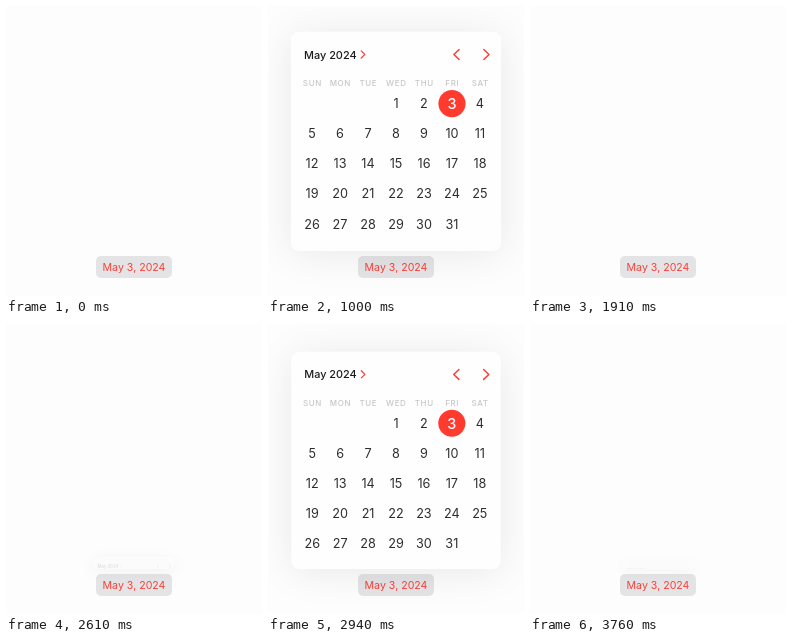
An HTML page with a canvas that plays this animation: 256 px wide and 290 px high, repeating every 3790 ms.

```html
<!DOCTYPE html>
<html lang="en">
<head>
<meta charset="utf-8">
<title>Compact date picker</title>
<style>
  html, body { margin: 0; width: 100%; height: 100%; overflow: hidden; background: #fdfdfd; }
  canvas { display: block; width: 256px; height: 290px; }
</style>
</head>
<body>
<canvas></canvas>
<script>
const W = 256, H = 290, LOOP = 3790;
const CARD = { w: 210, h: 219.5, bottom: 245, radius: 8 };
const RED = '#ff3b30', INK = '#1c1c1e', SOFT_INK = '#2e2e30';
const canvas = document.querySelector('canvas');
const ctx = canvas.getContext('2d');
const dpr = window.devicePixelRatio || 1;
canvas.width = W * dpr;
canvas.height = H * dpr;

// Soft start, quick rise, long tail
const settle = (t, rate) =>
  (1 - Math.exp(-((t / 60) ** 2))) * (1 - Math.exp(-rate * (t / 170) ** 0.713));
const collapse = u => u < 1 ? (1 - u ** 3) ** 3 : 0;

// How far the popover is open, 0 to 1
function openness(t) {
  if (t < 820) return 0;
  if (t < 1240) return settle(t - 800, 6);
  if (t < 1640) return 1;
  if (t < 1910) return collapse((t - 1640) / 270);
  if (t < 2610) return 0;
  if (t < 3090) return settle(t - 2590, 2.75);
  if (t < 3550) return 1;
  return collapse((t - 3550) / 240);
}

function text(str, x, y, size, color, weight = 400, align = 'center', spacing = 0) {
  ctx.font = `${weight} ${size}px Inter, sans-serif`;
  ctx.letterSpacing = spacing + 'px';
  ctx.textAlign = align;
  ctx.fillStyle = color;
  ctx.fillText(str, x, y);
}

function roundBox(x, y, w, h, r, color) {
  ctx.beginPath();
  ctx.roundRect(x, y, w, h, r);
  ctx.fillStyle = color;
  ctx.fill();
}

function chevron(x, y, dx, dy, width) {
  ctx.beginPath();
  ctx.moveTo(x - dx, y - dy);
  ctx.lineTo(x + dx, y);
  ctx.lineTo(x - dx, y + dy);
  ctx.lineWidth = width;
  ctx.lineCap = ctx.lineJoin = 'round';
  ctx.strokeStyle = RED;
  ctx.stroke();
}

function drawMonth() {
  text('May 2024', 13, 26.9, 10.9, INK, 500, 'left');
  chevron(72, 22.7, 1.8, 3.6, 1.2);
  chevron(165.5, 22.8, -2.6, 5, 1.45);
  chevron(195.5, 22.8, 2.6, 5, 1.45);
  ['SUN', 'MON', 'TUE', 'WED', 'THU', 'FRI', 'SAT'].forEach((name, i) =>
    text(name, 21.3 + i * 28, 54, 8, '#c6c6c8', 500, 'center', 0.6));
  for (let day = 1; day <= 31; day++) {
    const cell = day + 2;
    const x = 21 + cell % 7 * 28, y = 71.8 + Math.floor(cell / 7) * 30.1;
    const selected = day === 3;
    if (selected) roundBox(x - 13.6, y - 13.6, 27.2, 27.2, 13.6, RED);
    const size = selected ? 14.5 : 12.7;
    text(day, x, y + size * 0.364, size, selected ? '#fff' : SOFT_INK, selected ? 500 : 400);
  }
}

function drawPopover(p) {
  const scale = p ** 0.315;
  const w = CARD.w * scale, h = CARD.h * p;
  const x = (W - w) / 2, y = CARD.bottom - h;
  ctx.save();
  ctx.globalAlpha = Math.min(1, 0.6 + p);
  ctx.shadowColor = 'rgba(0,0,0,.085)';
  ctx.shadowBlur = 40 * scale * dpr;
  ctx.shadowOffsetY = 3 * dpr;
  roundBox(x, y, w, h, Math.min(CARD.radius, h / 2), '#fefefe');
  ctx.shadowColor = 'transparent';
  ctx.clip();
  ctx.globalAlpha = Math.min(1, p * 2.5);
  ctx.translate(x, y);
  ctx.scale(scale, scale);
  drawMonth();
  ctx.restore();
}

function draw(t) {
  ctx.setTransform(dpr, 0, 0, dpr, 0, 0);
  ctx.fillStyle = '#fdfdfd';
  ctx.fillRect(0, 0, W, H);
  roundBox(90, 250, 76, 22, 5, '#e4e4e6');
  text('May 3, 2024', 128, 264.9, 10.6, '#fa4039');
  const p = openness(t);
  if (p > 0.002) drawPopover(p);
}

const start = performance.now();
function tick() {
  draw((performance.now() - start) % LOOP);
  requestAnimationFrame(tick);
}
tick();
</script>
</body>
</html>
```
